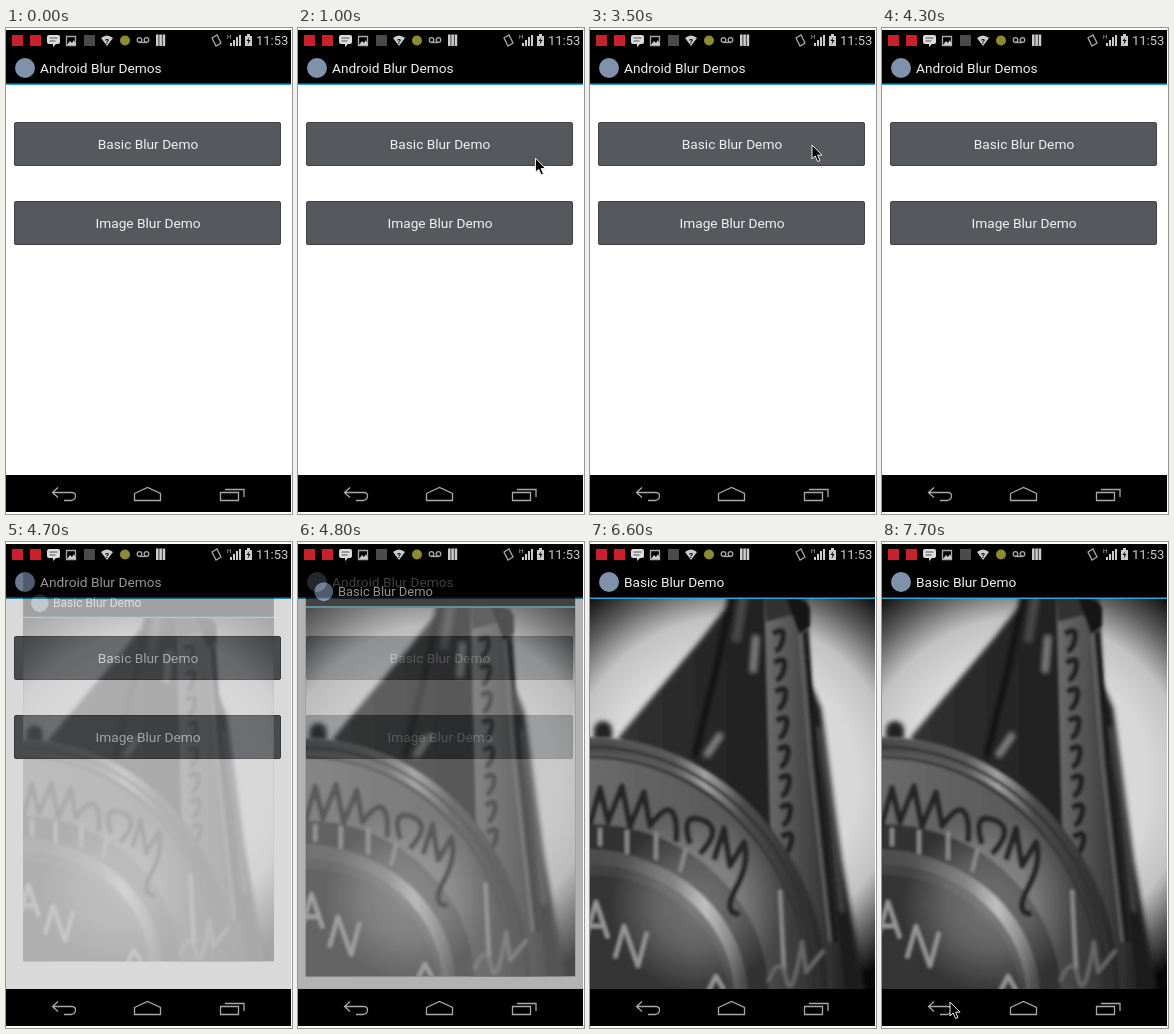
These frames come from a looping animation (286 by 486 pixels, 8000 ms). An HTML page:

```html
<!DOCTYPE html>
<html lang="en">
<head>
<meta charset="utf-8">
<title>Blur demos</title>
<style>
  html, body { margin: 0; width: 286px; height: 486px; overflow: hidden; background: #fff; }
  svg { display: block; font: 13.7px Roboto, sans-serif; }
  .line { fill: none; stroke: #a8a8a8; stroke-width: 1.3; }
</style>
</head>
<body>
<svg width="286" height="486" viewBox="0 0 286 486">
  <defs>
    <radialGradient id="sky" gradientUnits="userSpaceOnUse" cx="142" cy="240" r="250">
      <stop offset=".5" stop-color="#d8d8d8"/>
      <stop offset=".66" stop-color="#c2c2c2"/>
      <stop offset=".8" stop-color="#5c5c5c"/>
      <stop offset=".94" stop-color="#080808"/>
    </radialGradient>
    <radialGradient id="glow" gradientUnits="userSpaceOnUse" cx="108" cy="362" r="88">
      <stop offset="0" stop-color="#fff" stop-opacity=".32"/>
      <stop offset=".5" stop-color="#fff" stop-opacity=".22"/>
      <stop offset="1" stop-color="#fff" stop-opacity="0"/>
    </radialGradient>
    <linearGradient id="roof" x1="0" x2="1">
      <stop offset="0" stop-color="#323232"/>
      <stop offset=".5" stop-color="#232323"/>
      <stop offset="1" stop-color="#161616"/>
    </linearGradient>
    <linearGradient id="mast" x1="0" x2="1">
      <stop offset="0" stop-color="#6c6c6c"/>
      <stop offset=".45" stop-color="#4c4c4c"/>
      <stop offset="1" stop-color="#222"/>
    </linearGradient>
    <linearGradient id="rim" gradientUnits="userSpaceOnUse" x1="0" x2="240">
      <stop offset="0" stop-color="#4c4c4c"/>
      <stop offset=".35" stop-color="#5c5c5c"/>
      <stop offset=".48" stop-color="#a2a2a2"/>
      <stop offset=".64" stop-color="#4c4c4c"/>
      <stop offset="1" stop-color="#262626"/>
    </linearGradient>
    <linearGradient id="band" gradientUnits="userSpaceOnUse" x1="0" x2="240">
      <stop offset="0" stop-color="#6a6a6a"/>
      <stop offset=".6" stop-color="#585858"/>
      <stop offset="1" stop-color="#2c2c2c"/>
    </linearGradient>
    <filter id="soft" x="-10%" y="-10%" width="120%" height="120%"><feGaussianBlur stdDeviation="2.6"/></filter>
    <filter id="fine" x="-10%" y="-10%" width="120%" height="120%"><feGaussianBlur stdDeviation="1.7"/></filter>
    <clipPath id="frame"><path d="M0 57H285V447H0z"/></clipPath>
  </defs>

  <g id="menu">
    <path d="M0 2H285V56H0z"/>
    <path d="M0 55.5H285V57H0z" fill="#2a9cc9"/>
    <circle cx="19" cy="40" r="10" fill="#8091ab"/>
    <text x="34" y="44.5" fill="#eee">Android Blur Demos</text>
    <g fill="#55585c" stroke="#414346">
      <rect x="8.5" y="94.5" width="266" height="43" rx="1.5"/>
      <rect x="8.5" y="173.5" width="266" height="43" rx="1.5"/>
    </g>
    <g fill="#f0f0f0" text-anchor="middle">
      <text x="142" y="121">Basic Blur Demo</text>
      <text x="142" y="200">Image Blur Demo</text>
    </g>
  </g>
  <path id="dim" d="M0 2H285V447H0z"/>

  <g id="demo">
    <path d="M0 2H285V447H0z"/>
    <g clip-path="url(#frame)">
      <path d="M0 57H285V447H0z" fill="url(#sky)"/>
      <g filter="url(#soft)">
        <path d="M148 50H215L222 160 270 460H180L60 240 28 196 70 146 112 96z" fill="url(#roof)"/>
        <path d="M220 140L231 166 252 320 279 470H235z" fill="#1d1d1d"/>
        <path d="M228 185L240 260 252 370" fill="none" stroke="#555" stroke-width="3"/>
        <path d="M142 50L126 128 104 216" fill="none" stroke="#111" stroke-width="6"/>
        <path d="M154 50L146 100" fill="none" stroke="#484848" stroke-width="8"/>
        <path d="M166 94L163 130M131 192L116 214" fill="none" stroke="#888" stroke-width="5"/>
        <path d="M4 198V188a9 9 0 0 1 18 0V198z" fill="#222"/>
      </g>
      <g filter="url(#fine)">
        <path d="M174 50L216 50 222 150 231 240 256 455H192L180 290z" fill="url(#mast)"/>
        <path d="M174 50H206V72L176 80z" fill="#303030"/>
        <path d="M196 56Q213 52 220 66V84L209 92z" fill="#141414"/>
        <path d="M210 92L220 220 240 400" fill="none" stroke="#6a6a6a" stroke-width="2"/>
        <path d="M215 90L226 220 246 400" fill="none" stroke="#151515" stroke-width="4"/>
        <path id="signs" fill="none" stroke="#242424" stroke-width="6"/>
      </g>
      <g filter="url(#fine)">
        <ellipse cx="0" cy="455" rx="238" ry="260" fill="url(#band)"/>
        <ellipse cx="0" cy="455" rx="230" ry="251" fill="none" stroke="url(#rim)" stroke-width="16"/>
        <ellipse cx="0" cy="455" rx="229" ry="250" fill="none" stroke="#333" stroke-width="3"/>
        <ellipse cx="0" cy="455" rx="219" ry="240" fill="none" stroke="#333" stroke-width="3"/>
        <ellipse cx="0" cy="455" rx="166" ry="160" fill="none" stroke="#303030" stroke-width="26"/>
        <ellipse cx="0" cy="455" rx="158" ry="146" fill="#424242"/>
        <ellipse cx="0" cy="455" rx="151" ry="139" fill="none" stroke="url(#rim)" stroke-width="13"/>
        <ellipse cx="0" cy="455" rx="138" ry="122" fill="#363636"/>
        <path d="M20 274H196V447H20z" fill="url(#glow)"/>
        <g fill="none" stroke-linejoin="round">
          <path d="M0 282L10 246 18 280 32 244 40 285 54 250 60 284Q76 262 82 270T86 300M100 302Q90 270 112 278T110 312M124 318L134 286 140 324 154 300Q160 320 146 346T150 372" stroke="#272727" stroke-width="6"/>
          <path d="M10 286V304M37 288V312M66 290V318M96 306L90 330M190 348L194 428" stroke="#8a8a8a" stroke-width="4"/>
          <path d="M-4 394L6 360 18 396M0 384H14M25 416L34 384 48 424 57 390M118 450L126 434 134 448" stroke="#979797" stroke-width="4"/>
          <path d="M178 440Q190 410 196 436T212 400L216 430 234 408" stroke="#666" stroke-width="4"/>
        </g>
      </g>
    </g>
    <path d="M0 55.5H285V57H0z" fill="#33a5d2"/>
    <circle cx="19" cy="40" r="10" fill="#8091ab"/>
    <text x="34" y="44.5" fill="#eee">Basic Blur Demo</text>
  </g>

  <g id="status">
    <path d="M0 2H285V24H0zM0 447H285V484H0z"/>
    <path d="M6 7h11v11H6zM24 7h11v11H24z" fill="#c9202c"/>
    <path d="M43 7h9q2 0 2 2v5q0 2-2 2h-2l-3 3v-3h-4q-2 0-2-2v-5q0-2 2-2z" fill="#ddd"/>
    <path d="M43.5 10h8M43.5 13h6" stroke="#555"/>
    <path d="M60.5 8.5h9v9h-9z" class="line"/>
    <path d="M61 17l3-4 2 2 2-3 2 5z" fill="#ccc"/>
    <path d="M78 7h11v11H78z" fill="#4a4a4a"/>
    <path d="M95 10q6-5 12 0l-6 8z" fill="#ccc"/>
    <text x="99" y="16" font-size="8" font-weight="700">?</text>
    <circle cx="119" cy="12.5" r="5" fill="#8d8a35"/>
    <g class="line">
      <circle cx="133.5" cy="12" r="2.3"/>
      <circle cx="140.5" cy="12" r="2.3"/>
      <path d="M133 14.5h8"/>
    </g>
    <path d="M150 6.5h2.600v11.500h-2.600zM153.300 6.500h2.600v11.500h-2.600zM156.600 6.500h2.600v11.500h-2.600z" fill="#ccc"/>
    <path d="M206 10l5-3 4 8-5 3z" class="line"/>
    <text x="221" y="11" font-size="6" fill="#ccc">H</text>
    <path d="M224 18h2v-3h-2zM227 18h2v-6h-2zM230 18h2v-9h-2zM233 18h2V7h-2z" fill="#ccc"/>
    <path d="M239 8h2V6h3v2h2v10h-7z" fill="#ccc"/>
    <path d="M243.5 9l-3 4h2l-1 4 3-5h-2z"/>
    <text x="250" y="17" font-size="13" fill="#ccc">11:53</text>
    <g class="line">
      <path d="M52 459.500L46.500 464.500 52 469.500M46.500 464.500H66Q70 465 69.500 468.500T65 472.500H58"/>
      <path d="M128.500 465.500L141.500 459.500 154.500 465.500V472.500H128.500z"/>
      <path d="M214.500 464.500H232.500V472.500H214.500zM219 461.500H238V469"/>
    </g>
  </g>

  <path id="cursor" d="M0 0V14L3.200 11 5.600 16.500 8 15.500 5.600 10.200H10z" stroke="#eee"/>
</svg>
<script>
const LOOP = 8000, STEP = 100;
const [demo, dim, cursor, signs] = ['demo', 'dim', 'cursor', 'signs'].map(id => document.getElementById(id));

// Raised letters running down the mast
signs.setAttribute('d', Array.from({ length: 8 }, (_, i) =>
  `M${183 + i * 1.2} ${92 + i * 29}q12-8 10 4t-8 13`).join(''));

// Pointer trips as [time, x, y]
const trips = [
  [[400, 284, 170], [1200, 222, 117], [4000, 222, 117], [4300, 290, 200]],
  [[7000, 275, 300], [7700, 68, 460], [LOOP, 68, 460]],
];

// Opening of the demo screen as [time, scale, opacity, dimming behind]
const opening = [[0, 1, 0, 0], [4700, .88, .25, .15], [4800, .945, .62, .3], [5600, 1, 1, 0]];

function pointerAt(t) {
  const trip = trips.find(p => t >= p[0][0] && t < p[p.length - 1][0]);
  if (!trip) return null;
  const i = trip.findIndex(p => t < p[0]);
  const [t0, x0, y0] = trip[i - 1], [t1, x1, y1] = trip[i];
  const k = (t - t0) / (t1 - t0);
  return [x0 + (x1 - x0) * k, y0 + (y1 - y0) * k];
}

function draw(now) {
  const t = Math.floor(now % LOOP / STEP) * STEP;
  const [, scale, opacity, shade] = opening.filter(s => s[0] <= t).pop();
  demo.setAttribute('transform', `translate(142.5 216) scale(${scale}) translate(-142.5 -216)`);
  demo.setAttribute('opacity', opacity);
  dim.setAttribute('opacity', shade);
  const spot = pointerAt(t);
  cursor.setAttribute('visibility', spot ? 'visible' : 'hidden');
  if (spot) cursor.setAttribute('transform', `translate(${spot})`);
  requestAnimationFrame(draw);
}
requestAnimationFrame(draw);
</script>
</body>
</html>
```
